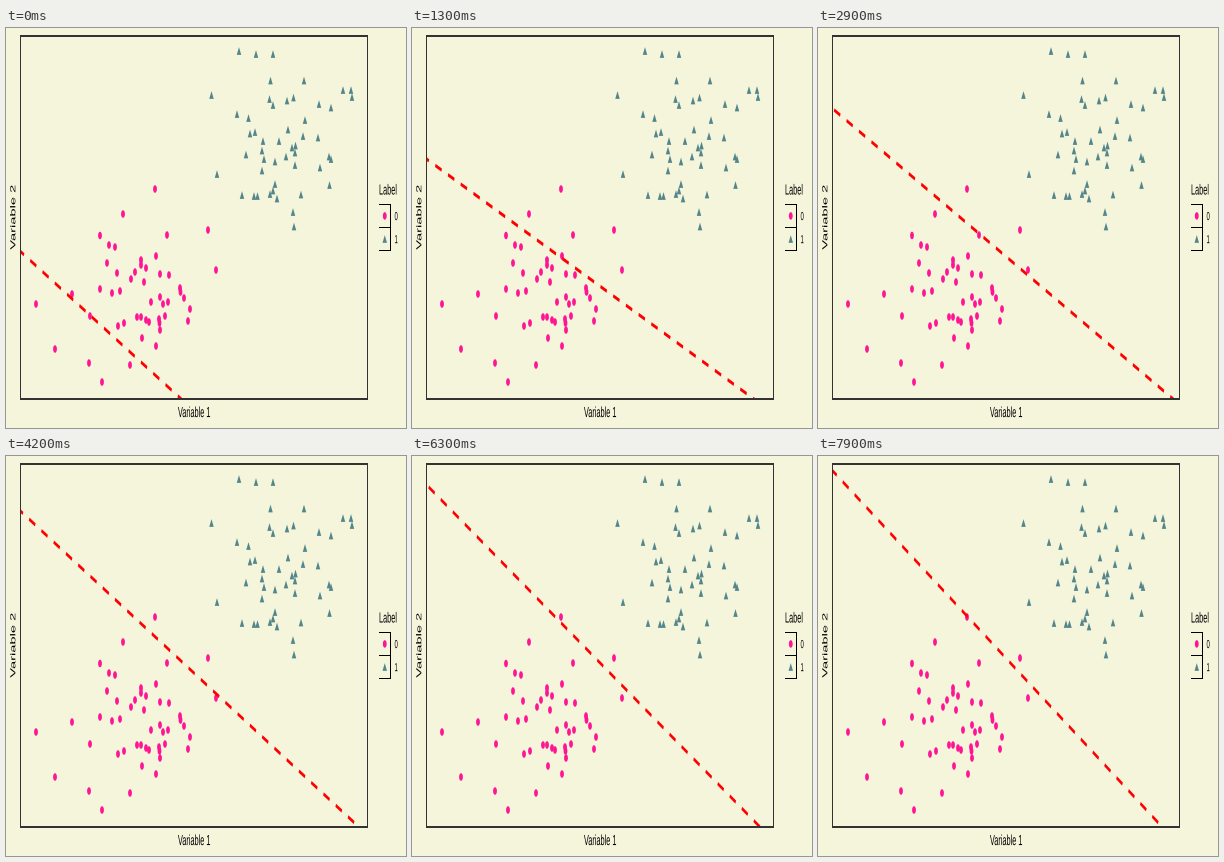
Write a matplotlib script that moves like this. It is 400 px wide and 400 px high and loops after 8 s.

```python
import numpy as np
import matplotlib.pyplot as plt
from matplotlib.animation import FuncAnimation
from matplotlib.collections import PolyCollection
from matplotlib.patches import Circle, PathPatch, Polygon, Rectangle
from matplotlib.textpath import TextPath
from matplotlib.transforms import Affine2D

# The plot is laid out at 600 x 300 and shown on a square stage.
W, H = 600, 300
SX, SY = W / 400, H / 400
FRAMES, STEP = 80, 100
LEFT, TOP, RIGHT, BOTTOM = 21.75, 6.1, 542.25, 278.1
BEIGE, PINK, TEAL = "#f5f5dc", "#ff1493", "#53868b"

ZEROS = [
    (149, 161), (117, 186), (94, 207.5), (161, 207), (202, 202), (103, 217),
    (109, 219), (150, 228), (101, 235), (135, 232), (135, 237), (140, 240),
    (111, 245), (129, 244), (125, 251), (154, 246), (163, 247), (138, 254),
    (210, 242), (94, 261), (106, 265), (114, 263), (66, 266), (174, 260),
    (174.5, 264), (178, 270), (154, 269), (145, 274), (157, 276), (162, 274),
    (30, 276), (184, 281), (84, 288), (131, 289), (135, 289), (159, 288),
    (182, 293), (118, 295), (112, 298), (140, 292), (143, 294), (153, 291),
    (153.5, 295), (154, 302), (136, 310), (150, 318), (49, 321), (83, 335),
    (124, 337), (96, 354),
]
ONES = [
    (233, 23), (250, 26), (267, 26), (264.5, 52.5), (298, 52.5), (337, 62),
    (345, 62), (346, 69), (205.5, 67), (263.5, 71), (267, 77), (281, 72.5),
    (287.5, 69.5), (313, 76), (325, 79.5), (231, 86), (242.5, 90), (299, 92),
    (244, 105.5), (249, 104), (282, 101.5), (297, 108), (312, 109.5),
    (257, 113), (273, 113), (256, 122.5), (286, 119.5), (289.5, 117.5),
    (289, 124.5), (240, 126.5), (258, 131), (269, 133.5), (280, 128.5),
    (323, 128.5), (325, 131), (289, 137), (314, 139.5), (256, 142.5),
    (211, 146), (269, 156), (323.5, 157), (267, 162.5), (264, 166),
    (236, 167), (248, 168), (251.5, 168), (271, 170.5), (295, 166.5),
    (287, 184), (288, 198.5),
]

fig = plt.figure(figsize=(4, 4), dpi=100, facecolor=BEIGE)
ax = fig.add_axes([0, 0, 1, 1])
ax.set_xlim(0, W)
ax.set_ylim(H, 0)
ax.axis("off")


def dot(x, y):
    ax.add_patch(Circle((x, y), 2.84, fc=PINK, lw=0, zorder=2))


def triangle(x, y):
    pts = [(x, y - 2.9), (x + 3.35, y + 2.9), (x - 3.35, y + 2.9)]
    ax.add_patch(Polygon(pts, fc=TEAL, lw=0, zorder=2))


def frame(x0, y0, x1, y1, color, w=1.07):
    h = w / 2
    for x, y, dx, dy in [
        (x0 - h, y0 - h, x1 - x0 + w, w), (x0 - h, y1 - h, x1 - x0 + w, w),
        (x0 - h, y0 + h, w, y1 - y0 - w), (x1 - h, y0 + h, w, y1 - y0 - w),
    ]:
        ax.add_patch(Rectangle((x, y), dx, dy, fc=color, lw=0, zorder=4))


def label(s, x, y, size=11, angle=0, centre=False):
    path = TextPath((0, 0), s, size=size, prop={"family": "Liberation Sans"})
    shift = path.get_extents().x1 / 2 if centre else 0
    place = Affine2D().translate(-shift, 0).scale(1, -1)
    place.rotate_deg(-angle).translate(x, y)
    ax.add_patch(PathPatch(place.transform_path(path), fc="black", lw=0, zorder=4))


for px, py in ZEROS:
    dot(px * SX, py * SY)
for px, py in ONES:
    triangle(px * SX, py * SY)

frame(LEFT, TOP, RIGHT, BOTTOM, "#333333")
label("Variable 1", 282, 291.8, centre=True)
label("Variable 2", 14, 142.2, angle=90, centre=True)

KEY, KX, KY = 17.28, 559.5, 132.3
label("Label", KX, 124.9)
for k, (mark, name) in enumerate([(dot, "0"), (triangle, "1")]):
    y = KY + k * KEY
    frame(KX, y, KX + KEY, y + KEY, "black")
    mark(KX + KEY / 2, y + KEY / 2)
    label(name, KX + KEY + 6, y + KEY / 2 + 3.15, size=8.8)

# Height at which the boundary meets the left edge, over seconds.
TIMES = np.array([0, .4, .9, 1.3, 1.8, 2.7, 3.6, 4.5, 5.4, 6.3, 7.2, 7.9])
HEIGHTS = np.array([223.5, 185.5, 150.5, 131, 111, 85.5,
                    65.5, 50.5, 38.5, 28.8, 20.7, 14.7])
SLOPES = np.gradient(HEIGHTS, TIMES)


def left_height(t):
    i = min(np.searchsorted(TIMES, t, side="right") - 1, len(TIMES) - 2)
    d = TIMES[i + 1] - TIMES[i]
    u = (t - TIMES[i]) / d
    return ((1 + 2 * u) * (1 - u) ** 2 * HEIGHTS[i]
            + u * (1 - u) ** 2 * d * SLOPES[i]
            + u * u * (3 - 2 * u) * HEIGHTS[i + 1]
            + u * u * (u - 1) * d * SLOPES[i + 1])


def bottom_x(t):
    return 362.8 - 2.38 * t - 187.8 * np.exp(-1.8 * t)


PERIOD, THICK = 20.3, 2.54
REACH = RIGHT - LEFT  # the line starts one panel width outside
STARTS = np.arange(80)[:, None] * PERIOD

boundary = PolyCollection([], facecolors="red", linewidths=0, zorder=3)
ax.add_collection(boundary, autolim=False)
boundary.set_clip_path(
    Rectangle((LEFT, TOP), REACH, BOTTOM - TOP, transform=ax.transData))


def update(i):
    t = i * STEP / 1000
    y0 = left_height(t) * SY
    m = (BOTTOM - y0) / (bottom_x(t) * SX - LEFT)
    along = np.array([1, m]) / np.hypot(1, m)
    side = np.array([-along[1], along[0]]) * THICK / 2
    a = np.array([LEFT - REACH, y0 - m * REACH]) + STARTS * along
    b = a + along * PERIOD / 2
    boundary.set_verts(np.stack([a + side, b + side, b - side, a - side], axis=1))
    return [boundary]


anim = FuncAnimation(fig, update, frames=FRAMES, interval=STEP,
                     repeat=True, repeat_delay=0)
plt.show()
```
